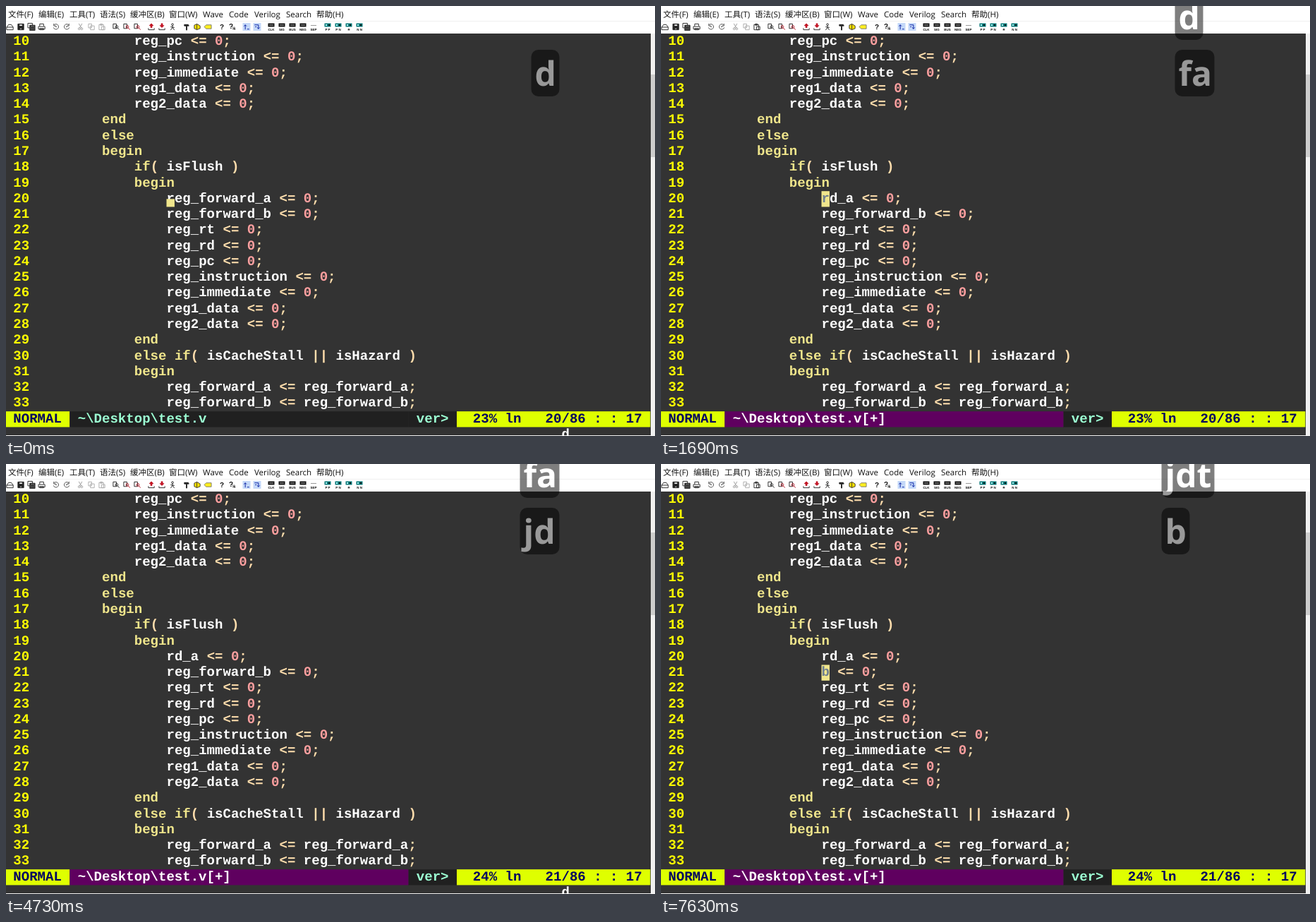
Write an HTML page that moves like this. It is 920x609 px and loops after 8 s.

```html
<!DOCTYPE html>
<html lang="zh">
<head>
<meta charset="utf-8">
<title>Editor</title>
<style>
html, body { margin: 0; width: 100%; height: 100%; overflow: hidden; background: #333; }
svg { display: block; width: 920px; height: 609px; }
text { white-space: pre; text-rendering: geometricPrecision; }
.code { font: bold 19.05px "Liberation Mono", monospace; }
.menu { font: 11.5px "Open Sans", "Noto Sans CJK SC", "Noto Sans CJK", sans-serif; }
.key { font: bold 48px "Open Sans", sans-serif; }
.tiny { font: bold 4.5px "Liberation Sans", sans-serif; text-anchor: middle; }
.help { font: bold 10px "Liberation Sans", sans-serif; text-anchor: middle; }
</style>
</head>
<body>
<svg viewBox="0 0 920 609"><g id="base"></g><g id="live"></g></svg>
<script>
const W = 11.43, H = 22.28, LEFT = -1.1, TOP = 39.4, LOOP = 8000;
const KHAKI = '#f0e68c', LIME = '#dfff00', NAVY = '#00005f', MINT = '#9cffd3';
const KEYWORDS = ['begin', 'end', 'else', 'if'];

const LINES = `
                reg_pc <= 0;
                reg_instruction <= 0;
                reg_immediate <= 0;
                reg1_data <= 0;
                reg2_data <= 0;
            end
            else
            begin
                if( isFlush )
                begin
                    reg_forward_a <= 0;
                    reg_forward_b <= 0;
                    reg_rt <= 0;
                    reg_rd <= 0;
                    reg_pc <= 0;
                    reg_instruction <= 0;
                    reg_immediate <= 0;
                    reg1_data <= 0;
                    reg2_data <= 0;
                end
                else if( isCacheStall || isHazard )
                begin
                    reg_forward_a <= reg_forward_a;
                    reg_forward_b <= reg_forward_b;`.slice(1).split('\n');

// start, file line, cursor height (1 full, .5 pending), key rows, command
const PHASES = [
  [0, 20, .5, '', 'd', 'd'],
  [1160, 20, .5, 'd', 'f', 'df'],
  [1690, 20, 1, 'd', 'fa', ''],
  [3240, 21, 1, 'fa', 'j', ''],
  [3960, 21, .5, 'fa', 'j', 'd'],
  [4050, 21, .5, 'fa', 'jd', 'd'],
  [4790, 21, .5, 'fa', 'jdt', 'dt'],
  [6050, 21, 1, 'jdt', 'b', '']
];
const HIDDEN = [[60, 340], [740, 980], [2400, 2620], [3010, 3240],
  [4730, 4790], [5470, 5680], [6700, 6980], [7350, 7630]];
const KEY_WIDTH = { '': 0, d: 40, f: 29, fa: 56, j: 25, jd: 56, jdt: 75, b: 40 };

const esc = s => s.replace(/&/g, '&amp;').replace(/</g, '&lt;');
const rect = (x, y, w, h, fill, more = '') =>
  `<rect x="${x}" y="${y}" width="${w}" height="${h}" fill="${fill}" ${more}/>`;
const text = (x, y, s, fill, cls) =>
  `<text class="${cls}" x="${x}" y="${y}" fill="${fill}">${esc(s)}</text>`;
const colX = col => LEFT + col * W;
const cell = (col, row, s, fill) => text(colX(col), TOP + row * H + 15.6, s, fill, 'code');
const bar = (from, to, fill) => rect(colX(from), TOP + 24 * H, (to - from) * W, H, fill);

function tokenColor(s) {
  if (KEYWORDS.includes(s)) return KHAKI;
  if (/^\d/.test(s)) return '#ffa0a0';
  return /^\w/.test(s) ? '#fff' : '#ffdead';
}

const codeLine = (s, row) => [...s.matchAll(/\w+|[^\s\w]+/g)]
  .map(m => cell(m.index, row, m[0], tokenColor(m[0]))).join('');

// Toolbar glyphs live in a 12 px box centred on x
const icon = (x, d, color = '#222', fill = 'none') =>
  `<path transform="translate(${x - 5.5} 24) scale(.92)" d="${d}" stroke="${color}" fill="${fill}" fill-rule="evenodd"/>`;
const FLOPPY = 'M1.5 1.5h9v9h-9zM3.5 2h5v3h-5zM4.5 8h3v2h-3z';
const PAGE = 'M1.5 1.5h5v7h-5z';
const LENS = 'M5 6a2 2 0 1 0 4 0a2 2 0 1 0-4 0M8.5 7.5l2.5 3';
const COPY = 'M1.5 1.5h5v6h-5zM4.5 4.5h6v6h-6z';
const PASTE = 'M1.5 2.5h7v8h-7zM3.5 1.5h3v2h-3zM5.5 5.5h5v5h-5z';
const TRAY = 'M1.5 8v2.5h9V8';

function toolbar() {
  let s = icon(6, 'M.5 10.5h10v-4h-10zM.5 6.5l3-4h4l3 4')
    + icon(21, FLOPPY, '#222', '#222')
    + icon(36, 'M.5 .5h7v7h-7z') + icon(36, 'M3.5 3.5h8v8h-8zM5.5 4h4v2h-4z', '#222', '#444')
    + icon(51, 'M2.5 5V1.5h6V5M.5 5.5h10v4h-10zM2.5 8.5h6v2h-6z')
    + icon(71, 'M3 3a4 4 0 1 1-1 4M2.5 1v3.5h3.5M5 6h2', '#444')
    + icon(86, 'M9 3a4 4 0 1 0 1 4M9.5 1v3.5H6M5 6h2', '#444')
    + icon(106, 'M3 1l4 7M8 1l-4 7M2 9a1.5 1.5 0 1 0 3 0a1.5 1.5 0 1 0-3 0M6 9a1.5 1.5 0 1 0 3 0a1.5 1.5 0 1 0-3 0', '#999')
    + icon(121, COPY, '#aaa');
  [156, 171, 186].forEach((x, i) => {
    s += icon(x, PAGE) + icon(x, LENS, i ? '#b01020' : '#222');
  });
  s += icon(206, TRAY) + icon(206, 'M6 1l3 3H7v3H5V4H3z', '#c01020', '#c01020')
    + icon(221, TRAY) + icon(221, 'M6 7l3-3H7V1H5v3H3z', '#c01020', '#c01020')
    + icon(236, 'M4.5 2.5a1.5 1.5 0 1 0 3 0a1.5 1.5 0 1 0-3 0M6 4v3L3 11M6 7l3 4M3 6l6 1')
    + icon(256, 'M2.5 2.5h6l1 2h-7zM5.5 5h1v6h-1z', '#222', '#222')
    + icon(271, 'M1.5 3.5l4-2l5 3v4l-5 2l-4-2zM5.5 2v8', '#333', '#ffe000')
    + icon(286, 'M.5 6l3-3h8v6h-8z', '#777', '#ffee20')
    + text(306, 33, '?', '#111', 'help') + text(319, 32, '?', '#111', 'help')
    + icon(321, 'M5 5l5 5M6 9l4 1l-1-4');
  for (const x of [341, 356]) s += rect(x - 5.5, 24, 11, 11, '#c4d8f8');
  s += icon(341, 'M4 10V3M2 5l2-2l2 2M7 9.5h3', '#0018a0')
    + icon(356, 'M2 3h6v6M6 7l2 2l2-2M3 6h2', '#0018a0');
  ['CLK', 'SIG', 'BUS', 'NEG', 'SEP'].forEach((label, i) => {
    const x = 376 + i * 15;
    s += i < 4 ? rect(x - 4.5, 24.5, 9, 5, '#111') + rect(x - 3, 26.5, 6, 1, '#aaa') : rect(x - 4, 27, 8, 1, '#999');
    s += text(x, 34.5, label, '#111', 'tiny');
  });
  ['P P', 'P N', '✳', 'N N'].forEach((label, i) => {
    const x = 456 + i * 15;
    s += rect(x - 4.5, 24.5, 9, 5, '#087878') + rect(x - 3, 26, 2, 2, '#bff')
      + rect(x + 1, 26, 2, 2, '#111') + text(x, 34.5, label, '#111', 'tiny');
  });
  return s;
}

function base() {
  const menu = [[3, '文件(F)'], [46, '编辑(E)'], [90, '工具(T)'], [133, '语法(S)'],
    [176, '缓冲区(B)'], [231, '窗口(W)'], [279, 'Wave'], [316, 'Code'],
    [352, 'Verilog'], [397, 'Search'], [440, '帮助(H)']];
  let s = rect(0, 0, 920, 609, '#333') + rect(0, 0, 920, 39, '#fff')
    + rect(0, 21, 920, 1, '#f0f0f0') + rect(0, 608, 920, 1, '#f0f0f0')
    + rect(914, 39, 6, 570, '#f0f0f0') + rect(914, 97, 6, 117, '#cdcdcd');
  for (const [x, label] of menu) s += text(x, 16, label, '#111', 'menu');
  s += toolbar();
  LINES.forEach((line, i) => {
    s += cell(1, i, String(i + 10), '#ff0');
    if (i !== 10 && i !== 11) s += codeLine(line, i);
  });
  return s + bar(0, 8, LIME) + cell(1, 24, 'NORMAL', NAVY)
    + bar(50, 56, '#202020') + cell(51, 24, 'ver>', MINT) + bar(56, 80, LIME);
}

function keyRow(keys, x, y) {
  if (!keys) return '';
  return `<g opacity=".5">${rect(x, y, KEY_WIDTH[keys], 66, '#000', 'rx="10"')}`
    + text(x + 5, y + 51, keys, '#fff', 'key') + '</g>';
}

function live(t) {
  const [start, line, height, above, keys, command] = PHASES.findLast(p => t >= p[0]);
  const edited = start >= 1690, row = line - 10;
  const codeA = edited ? ' '.repeat(20) + 'rd_a <= 0;' : LINES[10];
  const codeB = start >= 6050 ? ' '.repeat(20) + 'b <= 0;' : LINES[11];
  let s = codeLine(codeA, 10) + codeLine(codeB, 11);

  if (!HIDDEN.some(([a, b]) => t >= a && t < b)) {
    s += rect(colX(20), TOP + (row + 1 - height) * H, W, height * H, KHAKI);
    if (height === 1) s += cell(20, row, (line === 20 ? codeA : codeB)[20], '#708090');
  }

  s += icon(136, PASTE, command ? '#aaa' : '#222')
    + bar(8, 50, edited ? '#5f005f' : '#202020')
    + cell(9, 24, '~\\Desktop\\test.v' + (edited ? '[+]' : ''), edited ? '#fff' : MINT)
    + cell(58, 24, `${line + 3}% ln   ${line}/86 : : 17`, NAVY)
    + cell(69, 25, command, '#fff');

  const x = 784.5 - Math.max(KEY_WIDTH[above], KEY_WIDTH[keys]);
  return s + keyRow(above, x, -18) + keyRow(keys, x, 62);
}

const layer = document.getElementById('live');
let shown = '';
document.getElementById('base').innerHTML = base();

function draw() {
  const next = live(performance.now() % LOOP);
  if (next !== shown) layer.innerHTML = shown = next;
  requestAnimationFrame(draw);
}
draw();
</script>
</body>
</html>
```
